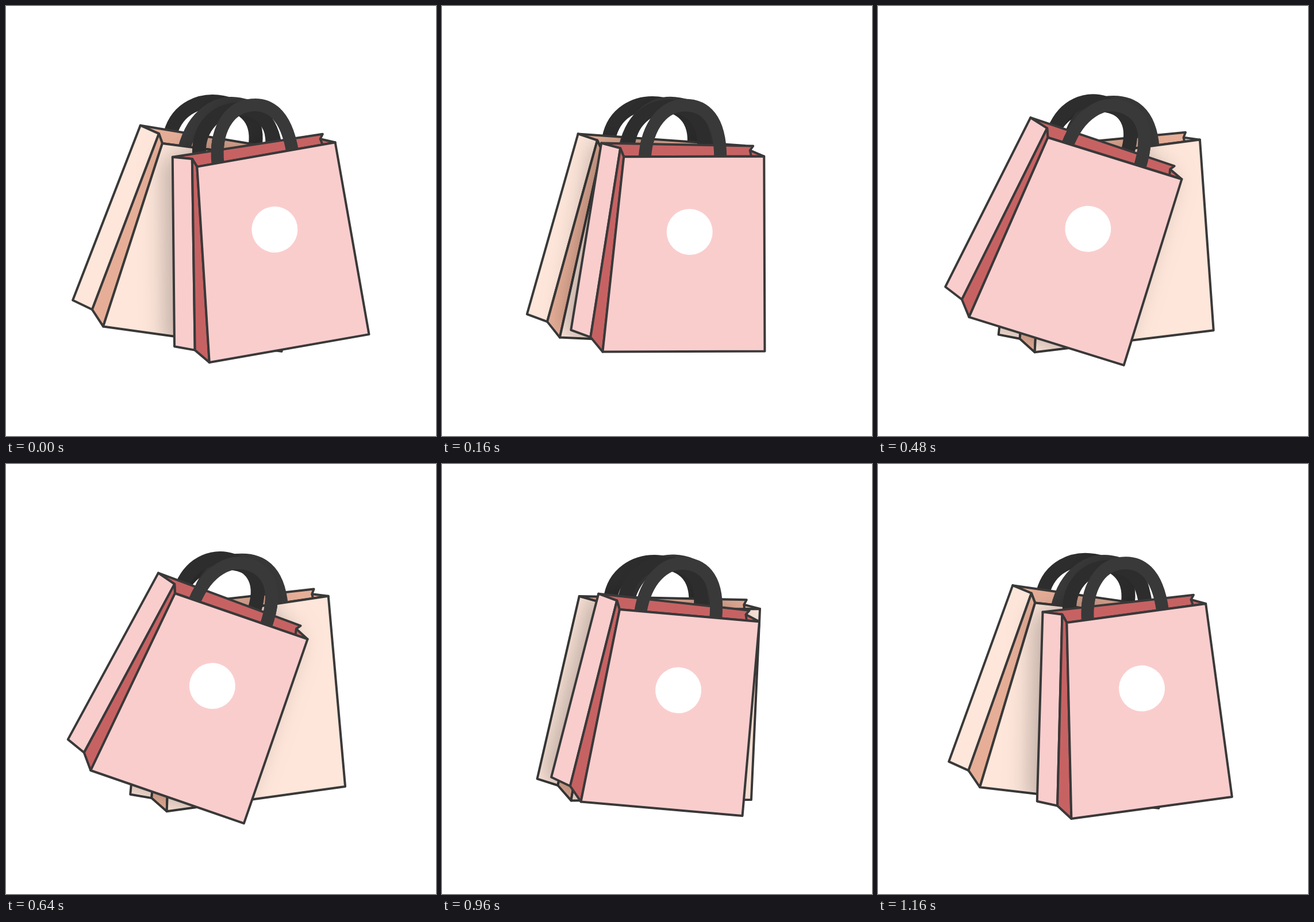
An HTML page with a canvas that plays this animation: 748x748 px, repeating every 1200 ms.

```html
<!DOCTYPE html>
<html lang="en">
<head>
<meta charset="utf-8">
<title>Swinging shopping bags</title>
<style>
  html, body { margin: 0; width: 100%; height: 100%; overflow: hidden; background: #fff; }
  canvas { display: block; width: 100vw; height: 100vh; }
</style>
</head>
<body>
<canvas id="stage" width="748" height="748"></canvas>
<script>
const ctx = document.getElementById('stage').getContext('2d');
const LOOP = 1200, STEP = 40;
const INK = '#393939', DARK = '#2d2d2d';

// Corner points of each bag when its front panel hangs upright.
// Handles: left foot, right foot, height of the top.
const backBag = {
  pivot: [392, 184], paper: '#fee6da', inside: '#e6ae97',
  sideTop: [241, 237], sideBottom: [182.4, 557.6],
  foldTop: [275.4, 245], foldBottom: [218.7, 567.3],
  topLeft: [284.4, 260.5], bottomLeft: [243, 592.6],
  topRight: [556, 244.5], bottomRight: [556, 577],
  rear: [532, 230], notch: [528, 238.5], notchEnd: [529, 246],
  rearHandle: [295, 240, 444, 240, 171],
  handle: [323.5, 262, 474, 254, 168]
};
const frontBag = {
  pivot: [420, 177], paper: '#facdcd', inside: '#c76263',
  sideTop: [277, 238], sideBottom: [223, 563],
  foldTop: [310, 247], foldBottom: [257, 575.5],
  topLeft: [316, 262], bottomLeft: [278, 601],
  topRight: [560, 262], bottomRight: [560, 601],
  rear: [541, 244], notch: [535.5, 251.5], notchEnd: [537.5, 261],
  rearHandle: [323, 245, 456, 247, 175],
  handle: [352.5, 264, 484, 264, 172.5],
  emblem: [430, 393, 40]
};

function trace(points) {
  ctx.beginPath();
  points.forEach(p => ctx.lineTo(...p));
}

function panel(points, color) {
  trace(points);
  ctx.closePath();
  ctx.fillStyle = color;
  ctx.fill();
  ctx.lineWidth = 4;
  ctx.strokeStyle = INK;
  ctx.stroke();
}

// A handle leaning right: a gentle left shoulder and a rounder right one.
function arch([x1, y1, x2, y2, top], color, width) {
  const span = x2 - x1, peak = x1 + span * 0.53;
  ctx.beginPath();
  ctx.moveTo(x1, y1);
  ctx.bezierCurveTo(x1 + 4, top + (y1 - top) * 0.35, peak - span * 0.26, top, peak, top);
  ctx.bezierCurveTo(peak + span * 0.27, top, x2, top + (y2 - top) * 0.26, x2, y2);
  ctx.lineWidth = width;
  ctx.strokeStyle = color;
  ctx.stroke();
}

const outline = b => [b.sideTop, b.rear, b.notch, b.topRight, b.bottomRight,
  b.bottomLeft, b.foldBottom, b.sideBottom];

function pose({ pivot: [x, y] }, degrees, drop = 0) {
  ctx.setTransform(1, 0, 0, 1, 0, 0);
  ctx.translate(x, y + drop);
  ctx.rotate(degrees * Math.PI / 180);
  ctx.translate(-x, -y);
}

function drawBag(b) {
  arch(b.rearHandle, DARK, 24);
  panel([b.sideTop, b.rear, b.notch, b.topRight, b.topLeft, b.foldTop], b.inside);
  trace([b.notch, b.notchEnd]);
  ctx.stroke();
  arch(b.handle, INK, 22);
  panel([b.sideTop, b.sideBottom, b.foldBottom, b.foldTop], b.paper);
  panel([b.foldTop, b.foldBottom, b.bottomLeft, b.topLeft], b.inside);
  panel([b.topLeft, b.topRight, b.bottomRight, b.bottomLeft], b.paper);
  if (b.emblem) {
    ctx.beginPath();
    ctx.arc(...b.emblem, 0, 2 * Math.PI);
    ctx.fillStyle = '#fff';
    ctx.fill();
  }
}

// Darkens only what is already painted.
function castShadow(b) {
  ctx.save();
  ctx.globalCompositeOperation = 'source-atop';
  ctx.shadowColor = 'rgba(0, 0, 0, 0.25)';
  ctx.shadowBlur = 40;
  ctx.shadowOffsetX = -15;
  arch(b.handle, INK, 22);
  trace(outline(b));
  ctx.fillStyle = b.paper;
  ctx.fill();
  ctx.restore();
}

// Brisk start, soft stop; the way back mirrors the way out.
function swing(t) {
  const s = 1 - Math.abs(1 - t / (LOOP / 2)), r = 1 - s;
  return 1.11 * s * r * r + 3 * s * s * r + s ** 3;
}

function draw(t) {
  const k = swing(t);
  const backAngle = 10.8 - 16 * k, frontAngle = -10 + 29.3 * k;
  const drop = 5 * Math.abs(Math.sin(frontAngle * Math.PI / 180));

  ctx.setTransform(1, 0, 0, 1, 0, 0);
  ctx.clearRect(0, 0, 748, 748);
  ctx.lineJoin = 'round';

  pose(backBag, backAngle);
  drawBag(backBag);
  pose(frontBag, frontAngle, drop);
  castShadow(frontBag);
  drawBag(frontBag);
}

function tick() {
  const t = performance.now() % LOOP;
  draw(Math.floor(t / STEP) * STEP);
  requestAnimationFrame(tick);
}
tick();
</script>
</body>
</html>
```
